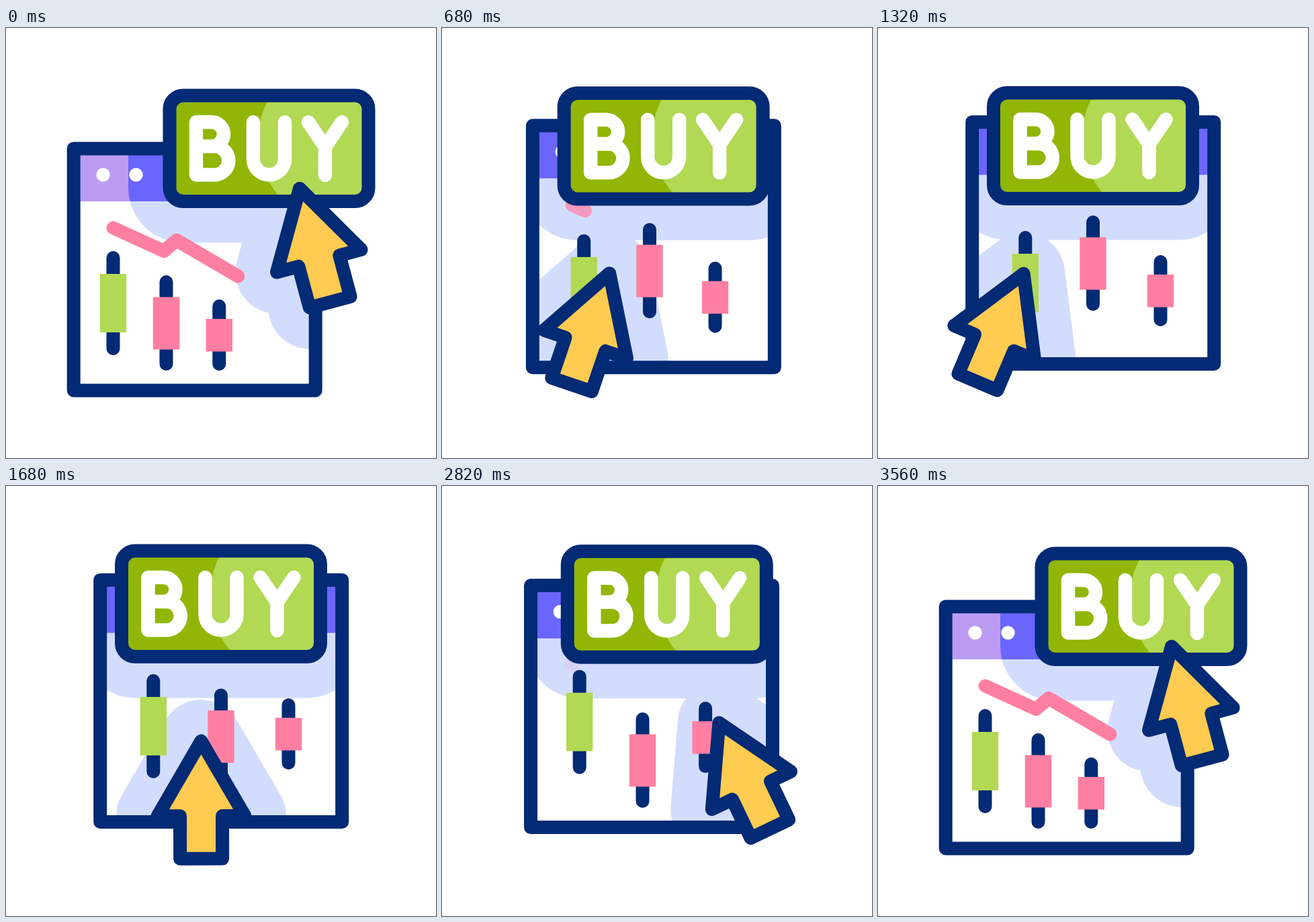
Recreate the animation shown at these times as an HTML page with a canvas. Size 640 px wide and 640 px high, loop 3.6 s.

```html
<!DOCTYPE html>
<html lang="en">
<head>
<meta charset="utf-8">
<title>Buy signal</title>
<style>
  html, body { margin: 0; width: 100%; height: 100%; overflow: hidden; background: #fff; }
  canvas { display: block; }
</style>
</head>
<body>
<canvas width="640" height="640" role="img" aria-label="BUY"></canvas>
<script>
const ctx = document.querySelector('canvas').getContext('2d');
const LOOP = 3600;
const NAVY = '#032a74', PINK = '#ff7fa2', LIME = '#b1d954';

const button = new Path2D();
button.roundRect(243.5, 100.5, 296, 157.5, 20);
const glare = new Path2D();
glare.arc(501, 167, 126, 0, 7);
const letters = new Path2D(
  'M283 140H306a18 18 0 0 1 0 36H283H310a21.3 21.3 0 0 1 0 42.6H283Z' +
  'M368 140V195a23.5 23.5 0 0 0 47 0V140M450 140L475 177L500 140M475 177V219');
const arrow = new Path2D(
  'M0-87L65 24.5H31.5V88H-31.5V24.5H-65Z');
const trend = new Path2D('M159.5 297.5L235 332L254 316L345.5 369.5');
const TREND_LENGTH = 214;

// x, rod top, rod bottom, body top, body height, shift x, shift y before and after the swing
const candles = [
  [159.5, 342, 477, 366, 87, 20.3, 10.5, -39.5, LIME],
  [238.5, 378, 500, 400.5, 78, 42, -50.5, 0.5, PINK],
  [317.3, 414, 500, 433, 48.5, 63.7, -25.5, -75.5, PINK]
];

// start, end, angle from, angle to, four control points of the path
const moves = [
  [50, 950, -15, 24, [459.5, 323], [419, 416], [281, 461], [178, 444]],
  [1200, 2240, 24, -28.3, [178, 444], [255, 475], [345, 475], [426, 439]],
  [2555, 3370, -28.3, -15, [426, 439], [473, 435], [478, 385], [459.5, 323]]
];

const mix = (a, b, k) => a + (b - a) * k;

// Eased progress along cubic-bezier(.5, 0, .45, 1)
function run(time, start, end) {
  const x = (time - start) / (end - start);
  if (x <= 0) return 0;
  if (x >= 1) return 1;
  let low = 0, high = 1, u;
  for (let i = 0; i < 24; i++) {
    u = (low + high) / 2;
    const v = 1 - u;
    if (1.5 * u * v * v + 1.35 * u * u * v + u * u * u < x) low = u; else high = u;
  }
  return u * u * (3 - 2 * u);
}

function cursorPose(time) {
  const [start, end, from, to, a, b, c, d] = moves.findLast(m => time >= m[0]) || moves[0];
  const k = run(time, start, end), r = 1 - k;
  const [x, y] = [0, 1].map(i =>
    r * r * r * a[i] + 3 * r * r * k * b[i] + 3 * r * k * k * c[i] + k * k * k * d[i]);
  return { x, y, angle: mix(from, to, k) * Math.PI / 180 };
}

function at(x, y, angle, paint) {
  ctx.save();
  ctx.translate(x, y);
  ctx.rotate(angle);
  paint();
  ctx.restore();
}

function stroke(path, color, width) {
  ctx.strokeStyle = color;
  ctx.lineWidth = width;
  ctx.stroke(path);
}

function fill(path, color) {
  ctx.fillStyle = color;
  ctx.fill(path);
}

function draw(time) {
  const slide = run(time, 50, 950) - run(time, 2555, 3370);
  const spread = run(time, 50, 950) - run(time, 2500, 3320);
  const swing = run(time, 1200, 2240);
  const shown = 1 - run(time, 8, 920) + run(time, 2740, 3540);
  const cursor = cursorPose(time);
  const winX = 39.5 * slide, winY = -39.5 * slide;

  const onWindow = paint => at(winX, winY, 0, paint);
  const onButton = paint => at(-71.5 * slide, -4 * slide, 0, paint);
  const onCursor = paint => at(cursor.x, cursor.y, cursor.angle, paint);

  // Window area with the wide halo of the button and cursor inside it
  function panel(top, height, base, halo) {
    ctx.save();
    ctx.beginPath();
    ctx.rect(105 + winX, top + winY, 352, height);
    ctx.clip();
    ctx.fillStyle = base;
    ctx.fillRect(0, 0, 640, 640);
    for (const [place, shape] of [[onButton, button], [onCursor, arrow]]) {
      place(() => { fill(shape, halo); stroke(shape, halo, 123); });
    }
    ctx.restore();
  }

  ctx.fillStyle = '#fff';
  ctx.fillRect(0, 0, 640, 640);
  ctx.lineCap = ctx.lineJoin = 'round';

  panel(258, 277, '#fff', '#d2ddfe');
  panel(184, 74, '#bc9bf3', '#6b66fb');

  onWindow(() => {
    const dots = new Path2D();
    dots.arc(144.5, 218.5, 10.2, 0, 7);
    dots.closePath();
    dots.moveTo(203.7, 218.5);
    dots.arc(193.5, 218.5, 10.2, 0, 7);
    fill(dots, '#fff');

    const frame = new Path2D();
    frame.rect(100.7, 179.4, 360, 360);
    stroke(frame, NAVY, 20);

    if (shown > 0.001) {
      ctx.save();
      ctx.globalAlpha = Math.min(1, shown * 7);
      if (shown < 1) ctx.setLineDash([shown * TREND_LENGTH, 999]);
      stroke(trend, PINK, 20);
      ctx.restore();
    }

    for (const [x, top, bottom, bodyTop, height, dx, dy1, dy2, color] of candles) {
      at(x + dx * spread, mix(dy1, dy2, swing) * spread, 0, () => {
        stroke(new Path2D(`M0 ${top}V${bottom}`), NAVY, 20);
        ctx.fillStyle = color;
        ctx.fillRect(-19.7, bodyTop, 39.4, height);
      });
    }
  });

  onButton(() => {
    fill(button, '#91b606');
    ctx.save();
    ctx.clip(button);
    fill(glare, LIME);
    ctx.restore();
    stroke(button, NAVY, 20);
    stroke(letters, '#fff', 20.5);
  });

  onCursor(() => {
    fill(arrow, '#ffcb50');
    stroke(arrow, NAVY, 20);
  });
}

function tick() {
  draw(performance.now() % LOOP);
  requestAnimationFrame(tick);
}
tick();
</script>
</body>
</html>
```
